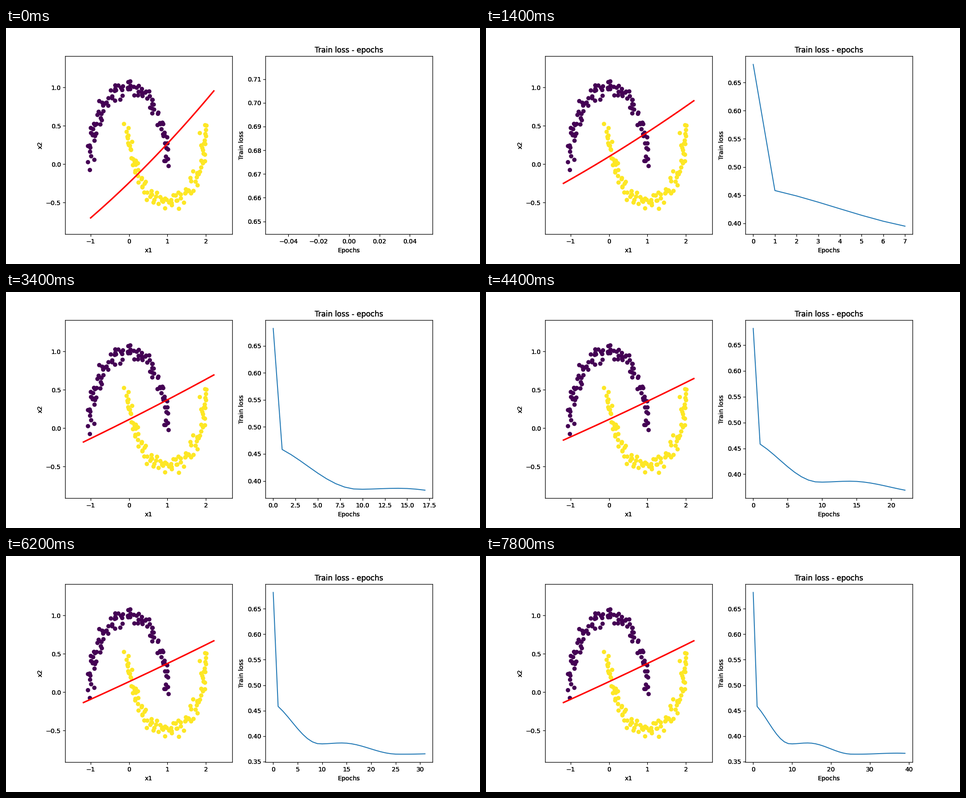
Write a matplotlib script that moves like this. It is 1058x529 px and loops after 8 s.

```python
import matplotlib.pyplot as plt
import numpy as np
from matplotlib.animation import FuncAnimation

W, H, DPI = 1058, 529, 100
EPOCHS, STEP_MS = 40, 200
FIRST_LOSS = .6821

# Turning points of the loss after the first epoch: (epoch, loss)
TURNS = [(-2, .4719), (9.6, .3847), (14, .3865),
         (25.5, .3645), (27, .3645), (37, .3665), (45, .3645)]

# Boundary heights at its left and right end: (epoch, left, right)
ENDS = [(0, -.78, .955), (7, -.25, .827), (17, -.18, .694),
        (22, -.155, .647), (31, -.135, .67)]
X_MIN, X_MAX, Y_MIN = -1.19, 2.21, -.70


def two_moons(n=200, noise=.05, seed=0):
    """Two interleaved half circles with shuffled order and normal noise."""
    rng = np.random.RandomState(seed)
    t = np.linspace(0, np.pi, n // 2)
    x = np.concatenate([np.cos(t), 1 - np.cos(t)])
    y = np.concatenate([np.sin(t), .5 - np.sin(t)])
    order = np.arange(n)
    rng.shuffle(order)
    points = np.column_stack([x, y])[order]
    return points + rng.normal(scale=noise, size=points.shape), order >= n // 2


def loss(epoch):
    """Sudden first drop, then cosine easing from turn to turn."""
    if epoch == 0:
        return FIRST_LOSS
    for (t0, v0), (t1, v1) in zip(TURNS, TURNS[1:]):
        if epoch <= t1:
            s = (epoch - t0) / (t1 - t0)
            return v0 + (v1 - v0) * (1 - np.cos(np.pi * s)) / 2


def boundary(epoch):
    """Sagging line that turns fast at first and then settles."""
    sag = .01 + .065 * np.exp(-epoch / 6)
    if epoch < 7:
        epoch = 7 * (1 - (1 - epoch / 7) ** 2)
    times, lefts, rights = zip(*ENDS)
    left = np.interp(epoch, times, lefts)
    right = np.interp(epoch, times, rights)
    s = np.linspace(0, 1, 200)
    y = left + (right - left) * s - 4 * sag * s * (1 - s)
    return X_MIN + s * (X_MAX - X_MIN), np.where(y < Y_MIN, np.nan, y)


def label(ax, layers=3, **texts):
    """Stack copies of the frame and its text for a heavy, dark edge."""
    ax.set(**texts)
    for _ in range(layers - 1):
        copy = fig.add_axes(ax.get_position().bounds, sharex=ax, sharey=ax,
                            facecolor="none")
        copy.set(**texts)


fig, (data_ax, loss_ax) = plt.subplots(1, 2, figsize=(W / DPI, H / DPI), dpi=DPI)
fig.subplots_adjust(left=.125, right=.9, bottom=.126, top=.88, wspace=.2)

points, labels = two_moons()
data_ax.scatter(*points.T, c=labels.astype(int), cmap="viridis")
line, = data_ax.plot([], [], color="red", lw=2.4, zorder=3)
data_ax.set(xlim=(-1.664, 2.690), ylim=(-.913, 1.406),
            xticks=[-1, 0, 1, 2], yticks=[-.5, 0, .5, 1])
label(data_ax, xlabel="x1", ylabel="x2")

curve, = loss_ax.plot([], [], color="#1f77b4")
label(loss_ax, title="Train loss - epochs", xlabel="Epochs",
      ylabel="Train loss")
losses = [loss(epoch) for epoch in range(EPOCHS)]


def update(epoch):
    line.set_data(*boundary(epoch))
    curve.set_data(range(epoch + 1), losses[:epoch + 1])
    loss_ax.relim()
    loss_ax.autoscale_view()
    return line, curve


anim = FuncAnimation(fig, update, frames=EPOCHS, interval=STEP_MS,
                     repeat=True, repeat_delay=0)
plt.show()
```
